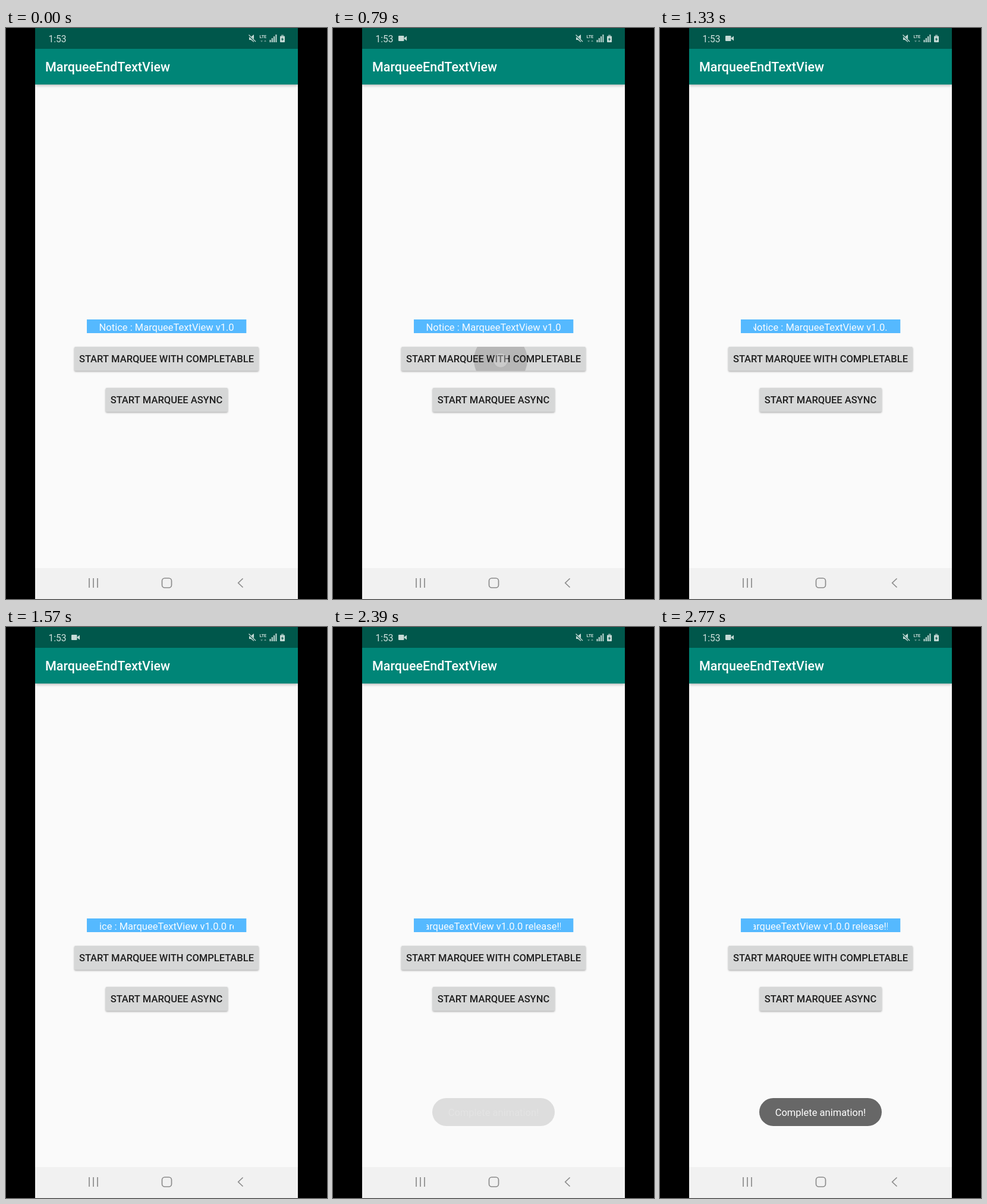
An HTML page with a canvas for the animation above (2830 ms loop, 540 by 960 pixels).

```html
<!DOCTYPE html>
<html lang="en">
<head>
<meta charset="utf-8">
<title>MarqueeEndTextView</title>
<style>
  html, body { margin: 0; width: 100%; height: 100%; overflow: hidden; background: #000; }
  canvas { display: block; width: 540px; height: 960px; }
</style>
</head>
<body>
<canvas id="stage" width="540" height="960"></canvas>
<script>
const ctx = document.getElementById('stage').getContext('2d');
const LOOP = 2830;
const ICON = '#c6dad6';
const NOTICE = 'Notice : MarqueeTextView v1.0.0 release!!';

// Active spans: start, end, number of steps; the picture rests in between.
const SPANS = [
  [210, 390, 4], [790, 1100, 6], [1330, 1810, 9], [1870, 2170, 6], [2390, 2770, 7]
];

const progress = (t, from, to) => Math.min(1, Math.max(0, (t - from) / (to - from)));

function stepTime(t) {
  const span = SPANS.filter(s => s[0] <= t).pop();
  if (!span) return 0;
  const [start, end, count] = span;
  const step = (end - start) / (count - 1);
  return start + Math.min(count - 1, Math.floor((t - start) / step)) * step;
}

function rect(x, y, w, h, color) {
  ctx.fillStyle = color;
  ctx.fillRect(x, y, w, h);
}

function pill(x, y, w, h, r, color) {
  ctx.fillStyle = color;
  ctx.beginPath();
  ctx.roundRect(x, y, w, h, r);
  ctx.fill();
}

function text(str, x, y, size, color, weight = 400, align = 'left') {
  ctx.font = `${weight} ${size}px Roboto, sans-serif`;
  ctx.textAlign = align;
  ctx.fillStyle = color;
  ctx.fillText(str, x, y);
}

function trace(points) {
  ctx.beginPath();
  points.forEach(([x, y]) => ctx.lineTo(x, y));
}

function poly(points, color) {
  trace(points);
  ctx.fillStyle = color;
  ctx.fill();
}

function line(points, color, width) {
  trace(points);
  ctx.strokeStyle = color;
  ctx.lineWidth = width;
  ctx.stroke();
}

function withShadow(blur, dy, alpha, draw) {
  ctx.save();
  ctx.shadowColor = `rgba(0,0,0,${alpha})`;
  ctx.shadowBlur = blur;
  ctx.shadowOffsetY = dy;
  draw();
  ctx.restore();
}

function faded(alpha, draw) {
  if (alpha <= 0) return;
  ctx.save();
  ctx.globalAlpha = alpha;
  draw();
  ctx.restore();
}

function statusIcons(t) {
  text('1:53', 71.5, 24, 15.6, '#cfe0dd');
  faded(t < 210 ? 0 : progress(t, 150, 330), () => {
    pill(110, 13, 9.5, 9, 1, ICON);
    poly([[119, 17.5], [124, 13.5], [124, 21.5]], ICON);
  });

  // Muted speaker
  poly([[409, 15], [412, 15], [417, 11], [417, 24], [412, 20], [409, 20]], ICON);
  line([[407.5, 11.5], [420, 23.5]], '#00574b', 2.6);
  line([[408.5, 11.5], [420, 23]], ICON, 1.3);

  text('LTE', 426.5, 17.2, 7.2, ICON, 700);
  poly([[428, 21], [432, 21], [430, 24]], '#5d918a');
  poly([[434, 23], [438, 23], [436, 20]], '#5d918a');

  for (let i = 0; i < 4; i++) {
    const h = 4 + i * 3;
    rect(443.5 + i * 3.3, 24 - h, 2, h, ICON);
  }

  rect(463, 11.5, 4, 2, '#7fa8a1');
  pill(461, 13.5, 8, 10.5, 1, ICON);
  poly([[465.5, 15.5], [462.8, 19.5], [464.7, 19.5], [464.3, 22.5], [467.2, 18.3], [465.2, 18.3]], '#00574b');
}

function navBar() {
  const gray = '#8b8b8b';
  rect(49, 908, 442, 52, '#f1f1f1');
  for (const x of [140, 147, 154]) line([[x, 925], [x, 941]], gray, 1.7);
  ctx.beginPath();
  ctx.roundRect(262.5, 925, 16, 16, 4.6);
  ctx.lineWidth = 1.7;
  ctx.stroke();
  line([[398.5, 925.5], [390.7, 933], [398.5, 940.5]], gray, 1.7);
}

function button(label, x, y, w, h) {
  withShadow(3, 1.2, 0.32, () => pill(x, y, w, h, 2, '#d6d7d7'));
  return () => text(label, 270, y + 26.4, 16.5, '#1f1f1f', 500, 'center');
}

function ripple(t) {
  if (t < 790) return;
  faded(1 - progress(t, 980, 1100), () => {
    ctx.beginPath();
    ctx.roundRect(115, 536, 310, 40.5, 2);
    ctx.clip();
    ctx.beginPath();
    ctx.arc(282, 558, 180 * progress(t, 730, 970), 0, Math.PI * 2);
    ctx.fillStyle = '#b6b6b6';
    ctx.fill();
  });
}

function touchDot(t) {
  const alpha = t < 210 ? 0 : progress(t, 150, 330) * (1 - progress(t, 730, 850));
  faded(alpha, () => {
    ctx.beginPath();
    ctx.arc(282, 558.8, 12, 0, Math.PI * 2);
    ctx.fillStyle = 'rgba(238,238,238,0.7)';
    ctx.fill();
    ctx.strokeStyle = 'rgba(165,165,165,0.5)';
    ctx.lineWidth = 1.3;
    ctx.stroke();
  });
}

function marquee(t) {
  const shift = t < 1330 ? 0 : 78 * progress(t, 1268, 2170);
  rect(136, 490, 268.3, 23, '#55b9ff');
  ctx.save();
  ctx.beginPath();
  ctx.rect(157.3, 490, 225.7, 23);
  ctx.clip();
  text(NOTICE, 156.6 - shift, 508.6, 16.5, '#f8fcff');
  ctx.restore();
}

function toast(t) {
  if (t < 2390) return;
  const alpha = 1 - Math.pow(1 - progress(t, 2330, 2770), 1.5);
  faded(alpha, () => pill(167, 792, 206, 47, 23.5, '#676767'));
  faded(alpha, () => text('Complete animation!', 270, 821.7, 16.5, '#fff', 400, 'center'));
}

function draw(t) {
  rect(0, 0, 540, 960, '#000');
  rect(49, 0, 442, 960, '#fafafa');
  ctx.save();
  ctx.beginPath();
  ctx.rect(49, 0, 442, 960);
  ctx.clip();
  withShadow(5, 1.5, 0.3, () => rect(49, 35, 442, 60, '#008577'));
  ctx.restore();
  rect(49, 0, 442, 35, '#00574b');
  statusIcons(t);
  text('MarqueeEndTextView', 66, 73.4, 21.5, '#fff', 500);

  marquee(t);
  const firstLabel = button('START MARQUEE WITH COMPLETABLE', 115, 536, 310, 40.5);
  ripple(t);
  firstLabel();
  button('START MARQUEE ASYNC', 167.7, 605, 205.3, 40.5)();
  touchDot(t);
  toast(t);
  navBar();
}

const origin = performance.now();
function tick() {
  draw(stepTime((performance.now() - origin) % LOOP));
  requestAnimationFrame(tick);
}
tick();
</script>
</body>
</html>
```
